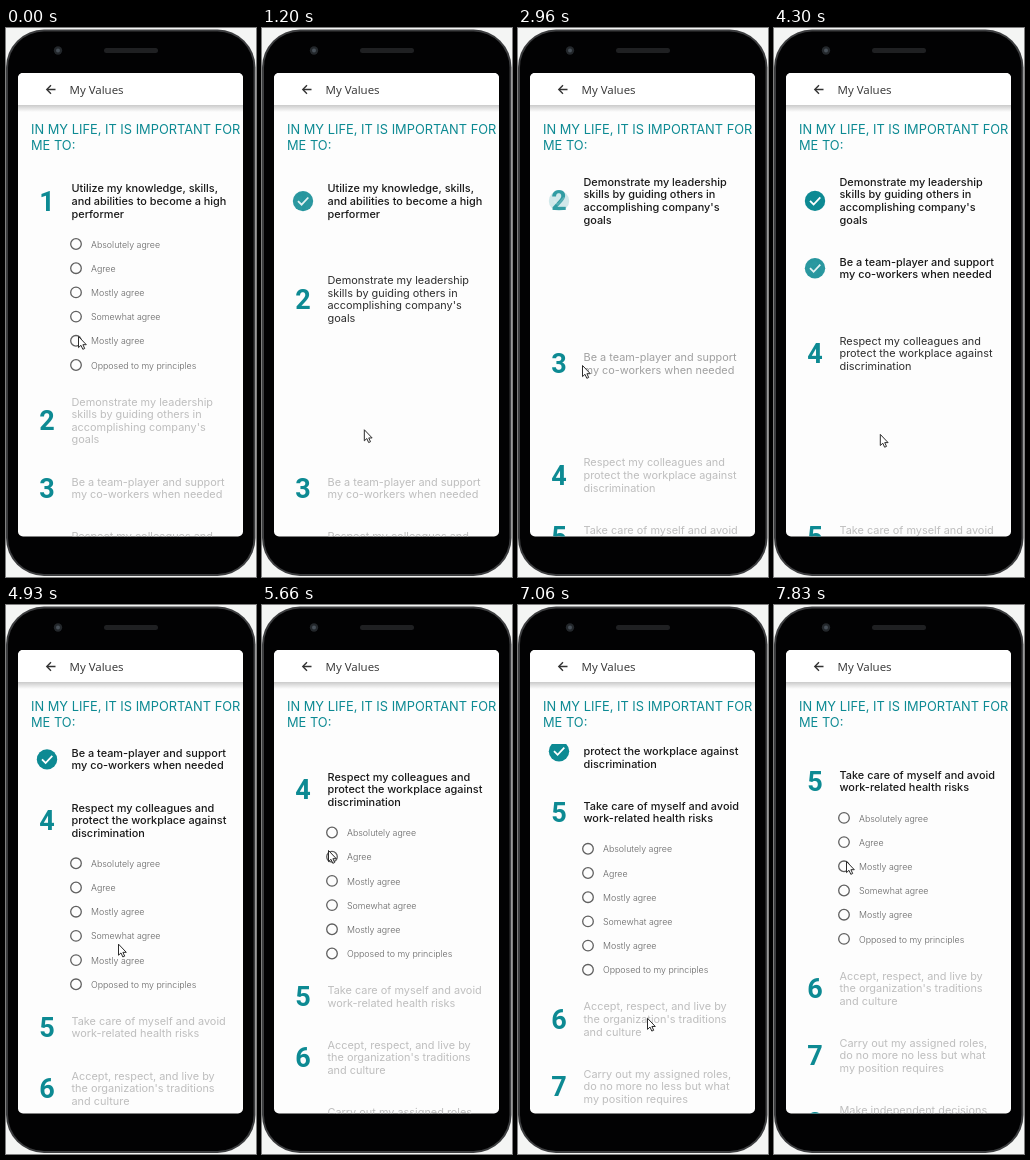
Animation, 250 px wide and 549 px high, one loop 8 s. Source, as an HTML page with a canvas:

```html
<!DOCTYPE html>
<html lang="en">
<head>
<meta charset="utf-8">
<title>My Values</title>
<style>
  html, body { margin: 0; width: 100%; height: 100%; overflow: hidden; background: #fff; }
  canvas { display: block; width: 250px; height: 549px; }
</style>
</head>
<body>
<canvas id="stage"></canvas>
<script>
const W = 250, H = 549, LOOP = 8000;
const canvas = document.getElementById('stage');
const ratio = window.devicePixelRatio || 1;
canvas.width = W * ratio;
canvas.height = H * ratio;
const ctx = canvas.getContext('2d');

const TEAL = '#0d8a93';
const LINE = 12.6, OPTION_GAP = 24.2, OPTIONS_HEIGHT = 146;
const LIST_TOP = 139, FIRST_Y = 160.5;
const FOLD = 350, FADE_OUT = 85, FADE_IN = 180;

const OPTIONS = ['Absolutely agree', 'Agree', 'Mostly agree', 'Somewhat agree',
  'Mostly agree', 'Opposed to my principles'];
const ITEMS = [
  ['Utilize my knowledge, skills,', 'and abilities to become a high', 'performer'],
  ['Demonstrate my leadership', 'skills by guiding others in', "accomplishing company's", 'goals'],
  ['Be a team-player and support', 'my co-workers when needed'],
  ['Respect my colleagues and', 'protect the workplace against', 'discrimination'],
  ['Take care of myself and avoid', 'work-related health risks'],
  ['Accept, respect, and live by', "the organization's traditions", 'and culture'],
  ['Carry out my assigned roles,', 'do no more no less but what', 'my position requires'],
  ['Make independent decisions', 'and take responsibility for', 'their results']
];

// Moment at which each answered item starts to fold.
const FOLD_AT = [942, 2822, 4042, 5790];

// Keys are [time, ...values], eased between neighbours.
const SCROLL = [[0, 0], [1350, 0], [1850, 73.8], [4500, 73.8], [5150, 190.4],
  [6600, 190.4], [7460, 259.7]];
const POINTER = [[0, 72, 308], [150, 72, 308], [530, 63, 264], [870, 63, 264],
  [1280, 106, 416], [1350, 106, 416], [1850, 106, 342], [2450, 64, 337], [2980, 64, 337],
  [3460, 66, 310], [3500, 66, 310], [3730, 62, 278], [3950, 62, 278],
  [4400, 112, 424], [4500, 112, 424], [5150, 112, 308], [5550, 66, 245], [5660, 66, 245],
  [6400, 129, 458], [6600, 129, 451], [7460, 129, 382], [7820, 72, 256]];

const clamp = v => Math.max(0, Math.min(1, v));
const smooth = v => { v = clamp(v); return v * v * (3 - 2 * v); };

function track(keys, t) {
  const next = keys.findIndex(k => k[0] > t);
  if (next < 0) return keys[keys.length - 1].slice(1);
  const a = keys[next - 1], b = keys[next];
  const u = smooth((t - a[0]) / (b[0] - a[0]));
  return a.slice(1).map((v, i) => v + (b[i + 1] - v) * u);
}

function folded(i, t) {
  if (i < 0) return 1;
  return i < FOLD_AT.length ? smooth((t - FOLD_AT[i]) / FOLD) : 0;
}
const blend = p => clamp((p - 0.22) / 0.7);

function optionsAlpha(i, t) {
  const shown = i === 0 ? 1
    : i > FOLD_AT.length ? 0
    : clamp((t - FOLD_AT[i - 1] - FOLD) / FADE_IN);
  const hidden = i < FOLD_AT.length ? clamp((t - FOLD_AT[i] + FADE_OUT) / FADE_OUT) : 0;
  return shown * (1 - hidden);
}

function text(str, x, y, font, color, align = 'left') {
  ctx.font = font;
  ctx.fillStyle = color;
  ctx.textAlign = align;
  ctx.fillText(str, x, y);
}

function box(x, y, w, h, r, fill) {
  ctx.beginPath();
  ctx.roundRect(x, y, w, h, r);
  ctx.fillStyle = fill;
  ctx.fill();
}

function disc(x, y, r, fill) {
  ctx.beginPath();
  ctx.arc(x, y, r, 0, Math.PI * 2);
  ctx.fillStyle = fill;
  ctx.fill();
}

function polyline(points, color, width) {
  ctx.beginPath();
  points.forEach(([x, y]) => ctx.lineTo(x, y));
  ctx.strokeStyle = color;
  ctx.lineWidth = width;
  ctx.stroke();
}

function drawPhone() {
  ctx.fillStyle = '#f4f5f4';
  ctx.fillRect(0, 0, W, H);
  box(0, 1.5, 249.5, 546.5, 38, '#3c3d3f');
  box(2, 3.5, 245.5, 542.5, 36, '#020203');
  box(98, 20, 54, 5, 2.5, '#1f2022');
  disc(52, 22.5, 4.2, '#23272b');
  disc(52, 22.5, 2, '#474f57');
}

function drawBadge(i, y, done) {
  ctx.globalAlpha = 1 - done;
  text(i + 1, 41, y + 9.5, '700 27px Roboto, sans-serif', TEAL, 'center');
  ctx.globalAlpha = done;
  disc(41, y, 10.2, TEAL);
  polyline([[36, y], [39.6, y + 3.6], [46.3, y - 3.6]], '#fff', 1.8);
  ctx.globalAlpha = 1;
}

function drawOptions(y, alpha) {
  if (!alpha) return;
  ctx.globalAlpha = alpha;
  OPTIONS.forEach((label, i) => {
    const cy = y + i * OPTION_GAP;
    ctx.beginPath();
    ctx.arc(70, cy, 5.3, 0, Math.PI * 2);
    ctx.strokeStyle = '#606060';
    ctx.lineWidth = 1.3;
    ctx.stroke();
    text(label, 85, cy + 3.6, '300 8.85px Inter, sans-serif', '#666');
  });
  ctx.globalAlpha = 1;
}

function drawList(t) {
  ctx.save();
  ctx.beginPath();
  ctx.rect(12, LIST_TOP, 225, 509 - LIST_TOP);
  ctx.clip();
  let y = FIRST_Y - track(SCROLL, t)[0];
  ITEMS.forEach((lines, i) => {
    const fold = folded(i, t), active = blend(folded(i - 1, t));
    const shade = Math.round(190 - 165 * active);
    const font = `${active === 1 ? 500 : 400} 10.9px Inter, sans-serif`;
    lines.forEach((line, n) => text(line, 65.5, y + n * LINE + 3.8,
      font, `rgb(${shade},${shade},${shade})`));
    drawBadge(i, y + (lines.length - 1) * LINE / 2, blend(fold));
    drawOptions(y + lines.length * LINE + 17.7, optionsAlpha(i, t));
    // Only the current item, or the one taking over, reserves room for options.
    const room = folded(i - 1, t) * (1 - fold);
    y += 29.5 + lines.length * LINE + OPTIONS_HEIGHT * room;
  });
  ctx.restore();
}

function drawHeader() {
  const shadow = ctx.createLinearGradient(0, 77, 0, 84);
  shadow.addColorStop(0, 'rgba(0,0,0,.2)');
  shadow.addColorStop(1, 'rgba(0,0,0,0)');
  ctx.fillStyle = shadow;
  ctx.fillRect(12, 77, 225, 7);
  ctx.fillStyle = '#fff';
  ctx.fillRect(12, 45, 225, 32);
  polyline([[49.5, 61.5], [41, 61.5]], '#333', 1.4);
  polyline([[45, 57.3], [40.8, 61.5], [45, 65.7]], '#333', 1.4);
  text('My Values', 63.5, 66, '11.5px "Open Sans", sans-serif', '#333');
  const font = '400 12.85px Inter, sans-serif';
  text('IN MY LIFE, IT IS IMPORTANT FOR', 25, 105.5, font, TEAL);
  text('ME TO:', 25, 121.5, font, TEAL);
}

function drawPointer(t) {
  const [x, y] = track(POINTER, t);
  ctx.save();
  ctx.translate(x, y);
  const arrow = new Path2D('M.5 .5V11.6L3 9.3 4.8 13.3 6.7 12.5 4.9 8.7H8.3Z');
  ctx.fillStyle = '#fff';
  ctx.fill(arrow);
  ctx.strokeStyle = '#2b2b2b';
  ctx.lineWidth = 1;
  ctx.stroke(arrow);
  ctx.restore();
}

function draw(now) {
  const t = now % LOOP;
  ctx.setTransform(ratio, 0, 0, ratio, 0, 0);
  drawPhone();
  ctx.save();
  ctx.beginPath();
  ctx.roundRect(12, 45, 225, 463.5, 5);
  ctx.clip();
  ctx.fillStyle = '#fdfdfd';
  ctx.fillRect(12, 45, 225, 464);
  drawList(t);
  drawHeader();
  drawPointer(t);
  ctx.restore();
}

const start = performance.now();
function frame() {
  draw(performance.now() - start);
  requestAnimationFrame(frame);
}
frame();
</script>
</body>
</html>
```
